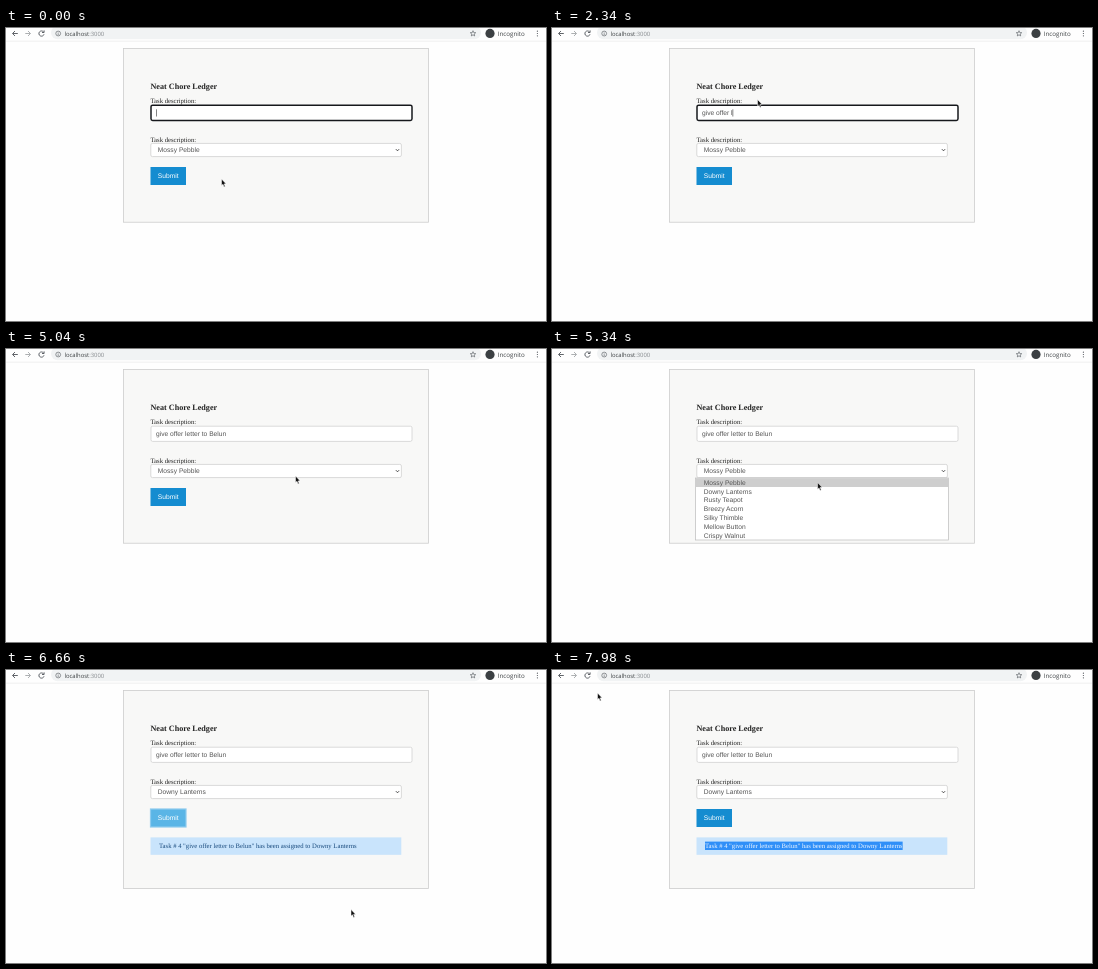
Write an HTML page that moves like this. It is 540x293 px and loops after 8000 ms.

```html
<!DOCTYPE html>
<html lang="en">
<head>
<meta charset="utf-8">
<title>Chore form</title>
<style>
  html, body { margin: 0; width: 100%; height: 100%; overflow: hidden; background: #fefefe; }
  svg { display: block; width: 100vw; height: 100vh; }
  text { white-space: pre; text-rendering: geometricPrecision; }
  .serif { font: 6.67px "Liberation Serif", serif; fill: #222; }
  .title { font: bold 8.15px "Liberation Serif", serif; fill: #222; }
  .sans { font: 6.67px "Liberation Sans", sans-serif; fill: #555; }
  .bar { font: 5.9px "Open Sans", sans-serif; fill: #3c4043; }
  .icon { fill: none; stroke: #50545a; stroke-width: .9; }
  .field { fill: #fff; stroke: #ccc; stroke-width: .7; }
  .field.focus { stroke: #16181c; stroke-width: 1.5; }
  #button { fill: #158cd0; }
  #button.lit { fill: #5ab5e6; stroke: #8ecbef; stroke-width: 1.2; }
</style>
</head>
<body>
<svg viewBox="0 0 540 293">
  <defs><clipPath id="selectedArea"><rect class="selection" x="153" y="171.6" height="8.4"/></clipPath></defs>

  <!-- browser toolbar -->
  <path d="M0 13.2H540" stroke="#e8e8e8" stroke-width=".7"/>
  <rect x="45" y="-2" width="430" height="13.2" rx="6.5" fill="#f1f3f4"/>
  <g class="icon">
    <path d="M11.8 5.5H6.8M9 3L6.5 5.5L9 8"/>
    <path d="M19.3 5.5H24.3M22 3L24.5 5.5L22 8" stroke="#a4a7aa"/>
    <path d="M37.6 4A2.6 2.6 0 1 0 38 6.3M38.1 2.4V4.5H36"/>
    <circle cx="52.2" cy="5.5" r="2.4" stroke-width=".6"/>
    <path d="M52.2 5.2V7M52.2 3.9V4.5" stroke-width=".6"/>
    <path id="star" stroke-width=".6"/>
  </g>
  <text class="bar" x="58.5" y="7.6">localhost<tspan fill="#85898d">:3000</tspan></text>
  <circle cx="484" cy="5.4" r="4.6" fill="#3c4043"/>
  <text class="bar" x="491.8" y="7.6" style="font-size:6.2px">Incognito</text>
  <path d="M531.4 3.2v0M531.4 5.5v0M531.4 7.8v0" stroke="#50545a" stroke-width="1.2" stroke-linecap="round"/>

  <!-- form -->
  <rect id="panel" x="117.5" y="20.5" width="305" fill="#f8f8f7" stroke="#ccc" stroke-width=".8"/>
  <text class="title" x="144.5" y="60.6">Neat Chore Ledger</text>
  <text class="serif" x="144.5" y="75">Task description:</text>
  <rect id="input" class="field" x="145" y="77.2" width="261" height="15.2" rx="1.6"/>
  <text id="typed" class="sans" x="150" y="87"></text>
  <rect id="caret" y="81.3" width=".6" height="7.2" fill="#333"/>
  <text class="serif" x="144.5" y="113.5">Task description:</text>
  <rect id="select" class="field" x="144.8" y="115.4" width="250.6" height="13.2" rx="1.6"/>
  <text id="choice" class="sans" x="151.8" y="124.4"></text>
  <path d="M389.9 121.2L391.5 122.8L393.1 121.2" fill="none" stroke="#333" stroke-width=".9"/>
  <rect id="button" x="144.5" y="139" width="35.5" height="18"/>
  <text class="sans" x="151.8" y="150.3" style="fill:#fff">Submit</text>

  <g id="notice">
    <rect x="144.5" y="167.4" width="250.8" height="17.4" fill="#c9e4fc"/>
    <text class="serif message" x="153" y="178.2" style="fill:#17497c"></text>
    <rect class="selection" x="153" y="171.6" height="8.4" fill="#2f8ff8"/>
    <text class="serif message" x="153" y="178.2" style="fill:#f2f8ff" clip-path="url(#selectedArea)"></text>
  </g>

  <g id="list"><rect x="143.5" y="129" width="253" height="62" fill="#fff" stroke="#bbb" stroke-width=".7"/></g>

  <path id="cursor" d="M0 0V6.6L1.5 5.3L2.5 7.9L3.7 7.4L2.6 4.9L4.5 4.7Z" fill="#111" stroke="#fff" stroke-width=".5"/>
</svg>
<script>
const $ = id => document.getElementById(id);
const all = selector => document.querySelectorAll(selector);
const show = (id, on) => $(id).setAttribute('visibility', on ? 'visible' : 'hidden');

const LOOP = 8000, STEP = 60;
const TASK = 'give offer letter to Belun';
const OPTIONS = ['Mossy Pebble', 'Downy Lanterns', 'Rusty Teapot', 'Breezy Acorn',
                 'Silky Thimble', 'Mellow Button', 'Crispy Walnut'];
const KEY_TIMES = [900, 1020, 1200, 1260, 1320, 1500, 1560, 1680, 1860, 1980, 2100,
                   2340, 2460, 2520, 2640, 2700, 2760, 2820, 2940, 2940, 3120,
                   3360, 3540, 3600, 3720, 3840];
const BLUR = 4620, OPEN = 5160, PICK = 5700, PRESS = 6120, NOTICE = 6240, DRAG = 7200;

// time, x, y of the pointer tip
const POINTER = [
  [0, 215.5, 151], [360, 205.5, 71.5], [4140, 205.5, 71.5], [4620, 300, 146], [4740, 300, 146],
  [5040, 289.5, 127], [5160, 285, 120], [5460, 255, 141], [5640, 255, 141], [6000, 165, 160.5],
  [6120, 166, 149], [6180, 166, 149], [6420, 345, 239.5], [6780, 345, 239.5],
  [7140, 152, 173], [7200, 152, 173], [7620, 374.5, 174], [7980, 45.5, 23]
];

function pointerAt(t) {
  const i = POINTER.findIndex(key => key[0] > t);
  if (i < 0) return POINTER.at(-1).slice(1);
  const [t0, x0, y0] = POINTER[i - 1], [t1, x1, y1] = POINTER[i];
  const u = (t - t0) / (t1 - t0), e = u * u * (3 - 2 * u);
  return [x0 + (x1 - x0) * e, y0 + (y1 - y0) * e];
}

const starPoints = Array.from({ length: 10 }, (_, i) => {
  const r = i % 2 ? 1.25 : 2.9, a = i * Math.PI / 5 - Math.PI / 2;
  return (467 + r * Math.cos(a)).toFixed(2) + ' ' + (5.6 + r * Math.sin(a)).toFixed(2);
});
$('star').setAttribute('d', 'M' + starPoints.join('L') + 'Z');

function addToList(tag, attributes, content = '') {
  const node = document.createElementNS('http://www.w3.org/2000/svg', tag);
  for (const name in attributes) node.setAttribute(name, attributes[name]);
  node.textContent = content;
  $('list').append(node);
  return node;
}
const ROW = 8.8;
const hover = addToList('rect', { x: 144, width: 252, height: ROW, fill: '#cecece' });
OPTIONS.forEach((name, i) =>
  addToList('text', { class: 'sans', x: 151.8, y: 135.8 + i * ROW }, name));

const messages = all('.message');
messages.forEach(node =>
  node.textContent = `Task # 4 "${TASK}" has been assigned to ${OPTIONS[1]}`);

function draw(t) {
  const [x, y] = pointerAt(t);
  $('cursor').setAttribute('transform', `translate(${x} ${y})`);

  const count = KEY_TIMES.filter(time => time <= t).length;
  $('typed').textContent = TASK.slice(0, count);
  $('caret').setAttribute('x', 150 + (count ? $('typed').getComputedTextLength() : 0));
  show('caret', t < 60 || (t >= 540 && t < BLUR));
  $('input').classList.toggle('focus', t < BLUR);

  $('choice').textContent = OPTIONS[t < PICK ? 0 : 1];
  $('select').classList.toggle('focus', t >= PICK && t < PRESS);
  show('list', t >= OPEN && t < PICK);
  const row = Math.max(0, Math.floor((y - 129.2) / ROW));
  hover.setAttribute('y', 129.2 + row * ROW);

  $('button').classList.toggle('lit', t >= PRESS && t < DRAG);
  show('notice', t >= NOTICE);
  $('panel').setAttribute('height', t >= NOTICE ? 198 : 173.7);

  const full = messages[0].getComputedTextLength();
  const dragX = t < DRAG ? 153 : t < 7620 ? x : 540;
  const selected = Math.max(0, Math.min(full, dragX - 153));
  all('.selection').forEach(node => node.setAttribute('width', selected));
}

const start = performance.now();
function tick() {
  const t = (performance.now() - start) % LOOP;
  draw(Math.floor(t / STEP) * STEP);
  requestAnimationFrame(tick);
}
tick();
</script>
</body>
</html>
```
